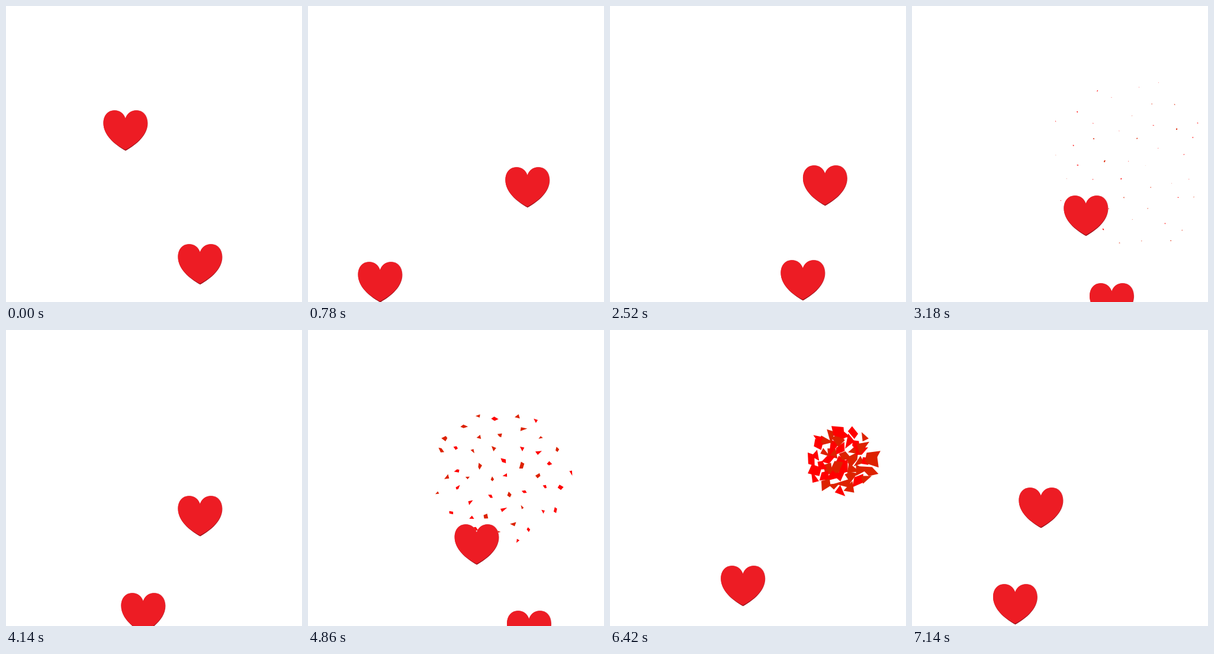
An HTML page with a canvas that plays this animation: 500 by 500 pixels, repeating every 7200 ms.

```html
<!DOCTYPE html>
<html lang="en">
<head>
<meta charset="utf-8">
<title>Popping hearts</title>
<style>
html, body { margin: 0; width: 100%; height: 100%; overflow: hidden; background: #fff; }
canvas { display: block; }
</style>
</head>
<body>
<canvas id="stage" width="500" height="500"></canvas>
<script>
const ctx = document.getElementById('stage').getContext('2d');
const STEP = 60, STEPS = 120;
const GAP = 15;      // steps between pops
const SHARDS = 48;
const GOLDEN = Math.PI * (3 - Math.sqrt(5));

// Where each heart pops, and how it gets there: x, top, drift, rise, bend
const hearts = [
  [202, 176, 0, 10],
  [377.5, 252, 3.3, 10],
  [88, 257, -2, 10.3],
  [374.8, 236, 4.09, 11, 0.102],
  [273.6, 250.6, -2.91, 9.91],
  [324.4, 209.5, -0.6, 11.75],
  [325, 241, 4.43, 9.67],
  [392.8, 186, 0.8, 12],
  [218.5, 255, 0.57, 11, 0.081],
  [82.5, 253, -5.75, 11]
];

let seed = 11;
function rand(a, b) {
  seed = (seed * 16807) % 2147483647;
  return a + (b - a) * seed / 2147483647;
}

// Shards fill a disc evenly, as seeds in a sunflower
const shards = Array.from({ length: SHARDS }, (_, i) => {
  const sides = rand(0, 1) < 0.5 ? 3 : 4;
  const size = rand(15, 21);
  const squash = rand(0.55, 1);
  const points = Array.from({ length: sides }, (_, k) => {
    const a = (k + rand(-0.25, 0.25)) * 2 * Math.PI / sides;
    const r = size * rand(0.65, 1.2);
    return [Math.cos(a) * r, Math.sin(a) * r * squash];
  });
  return {
    points,
    reach: 86 * Math.sqrt((i + 0.5) / SHARDS) + rand(-4, 4),
    way: i * GOLDEN + rand(-0.1, 0.1),
    angle: rand(0, 2 * Math.PI),
    spin: rand(-0.35, 0.35),
    life: rand(8.2, 8.9),
    color: rand(0, 1) < 0.58 ? '#dd2200' : '#ff0000'
  };
});

const shape = new Path2D(
  'M0 14C-3 5-10 0-18.5 0C-30 0-37.5 9-37.5 22C-37.5 42-19 58 0 68.5' +
  'C19 58 37.5 42 37.5 22C37.5 9 30 0 18.5 0C10 0 3 5 0 14Z');

const rim = ctx.createLinearGradient(0, 0, 0, 68);
rim.addColorStop(0, '#e08088');
rim.addColorStop(0.4, '#c8303a');
rim.addColorStop(1, '#98101a');

function drawHeart(x, y) {
  ctx.save();
  ctx.translate(x, y);
  ctx.fillStyle = rim;
  ctx.fill(shape);
  ctx.translate(-0.4, 0.2);
  ctx.scale(0.99, 0.975);
  ctx.fillStyle = '#ed1c24';
  ctx.fill(shape);
  ctx.restore();
}

function drawBurst(x, y, age, turn) {
  const spread = 0.28 + 0.18 * age;
  for (const s of shards) {
    const size = 1 - age / s.life;
    if (size <= 0) continue;
    const way = s.way + turn, reach = s.reach * spread;
    ctx.save();
    ctx.translate(x + Math.cos(way) * reach, y + Math.sin(way) * reach);
    ctx.rotate(s.angle + turn + s.spin * age);
    ctx.scale(size, size);
    ctx.beginPath();
    for (const p of s.points) ctx.lineTo(p[0], p[1]);
    ctx.closePath();
    ctx.fillStyle = s.color;
    ctx.fill();
    ctx.restore();
  }
}

function draw(step) {
  ctx.fillStyle = '#fff';
  ctx.fillRect(0, 0, 500, 500);
  hearts.forEach(([x, top, drift, rise, bend = 0], i) => {
    const left = i * GAP - step;   // steps until the pop
    if (left < 0) {
      drawBurst(x, top + 34, -left, i * 1.3);
      return;
    }
    const y = top + rise * left;
    if (y < 500) drawHeart(x - drift * left + bend * left * left, y);
  });
}

const start = performance.now();
function tick() {
  const t = Math.max(0, performance.now() - start);
  draw(Math.floor(t / STEP) % STEPS);
  requestAnimationFrame(tick);
}
tick();
</script>
</body>
</html>
```
